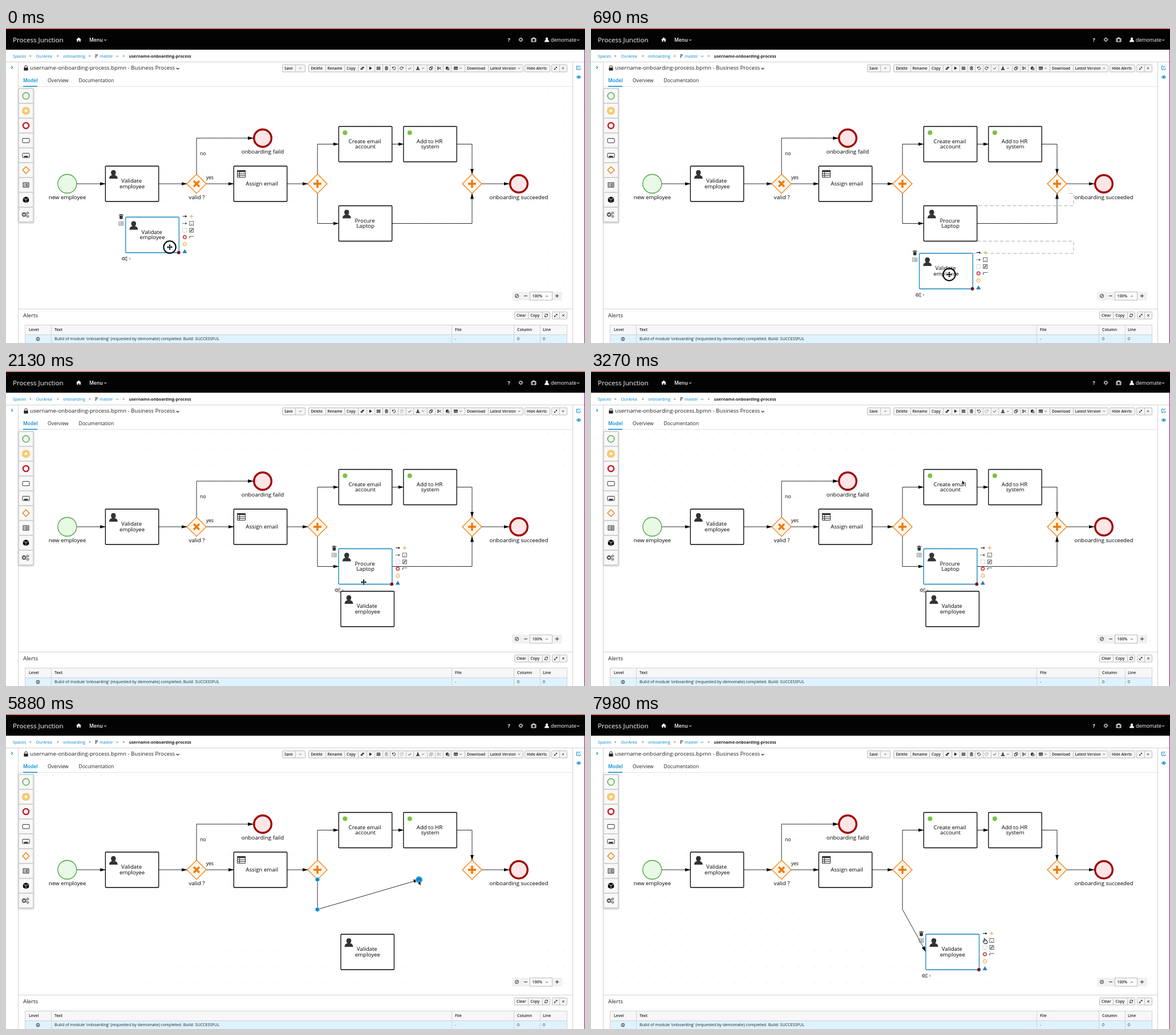
Animation, 1015 px wide and 552 px high, one loop 8 s. Source, as an HTML page:

```html
<!DOCTYPE html>
<html lang="en">
<head>
<meta charset="utf-8">
<title>Process editor</title>
<style>
html, body { margin: 0; width: 100%; height: 100%; overflow: hidden; background: #fff; }
svg { display: block; width: 1015px; height: 552px; font-family: "Open Sans", "Noto Sans", sans-serif; }
.i { fill: none; stroke: currentColor; stroke-width: 1; }
.f { fill: currentColor; stroke: none; }
.picked > rect { stroke: #2a8fc4; filter: drop-shadow(0 0 1px rgba(0, 136, 206, .45)); }
.joining > rect { stroke: #3f73c8; filter: drop-shadow(0 0 1.5px rgba(40, 100, 210, .6)); }
</style>
</head>
<body>
<svg id="stage" viewBox="0 0 1015 552" xmlns="http://www.w3.org/2000/svg"></svg>
<script>
const BLUE = '#0088ce', INK = '#222', ORANGE = '#ec7a08', LINE = '#d1d1d1';

// ---- drawing helpers
const text = (x, y, s, size, o = {}) =>
  `<text x="${x}" y="${y}" font-size="${size}" fill="${o.c || INK}" font-weight="${o.w || 400}" text-anchor="${o.a || 'start'}">${s}</text>`;
const mid = (x, y, s, size = 9.7, c = '#000') => text(x, y, s, size, { a: 'middle', c });
const rect = (x, y, w, h, fill, stroke = 'none', extra = '') =>
  `<rect x="${x}" y="${y}" width="${w}" height="${h}" fill="${fill}" stroke="${stroke}" ${extra}/>`;
const circle = (x, y, r, fill, stroke = 'none', sw = 1) =>
  `<circle cx="${x}" cy="${y}" r="${r}" fill="${fill}" stroke="${stroke}" stroke-width="${sw}"/>`;
const line = (d, c = LINE, w = 1, extra = '') =>
  `<path d="${d}" fill="none" stroke="${c}" stroke-width="${w}" ${extra}/>`;
const group = (id, body, extra = '') => `<g id="${id}" ${extra}>${body}</g>`;

const p = d => `<path class="i" d="${d}"/>`;
const s = d => `<path class="f" d="${d}"/>`;
const gear = '<circle class="i" r="2.2" stroke-width="1.7"/><circle class="i" r="3.4" stroke-width="1.3" stroke-dasharray="1.4 1.27"/>';
const icons = {
  caret: p('M-2 -1L0 1L2 -1'),
  up: p('M-2 1L0 -1L2 1'),
  right: p('M-1 -2L1 0L-1 2'),
  home: s('M0 -4L4.5 0H3.2V3.6H1V1H-1V3.6H-3.2V0H-4.5Z'),
  gear,
  gears: `<g transform="translate(-2 0) scale(.95)">${gear}</g><g transform="translate(3.5 -2.5) scale(.55)">${gear}</g><g transform="translate(3.5 2.7) scale(.55)">${gear}</g>`,
  bag: p('M-4 -2H4V3.5H-4ZM-1.5 -2V-3.5H1.5V-2M-2.3 -2V3.5M2.3 -2V3.5'),
  user: s('M0 -4A2.2 2.4 0 0 1 1.3 .3Q4 .8 4 4H-4Q-4 .8 -1.3 .3A2.2 2.4 0 0 1 0 -4Z'),
  lock: s('M-3.6 -.5H3.6V4.5H-3.6Z') + p('M-2.2 0V-2A2.2 2.2 0 0 1 2.2 -2V0'),
  branch: p('M-1.5 -3V3M1.7 -2.5V-1.2Q1.7 0 -1.5 1.5') + s('M-2.6 -3.8H-.4V-2H-2.6ZM-2.6 2H-.4V3.8H-2.6ZM.6 -3.6H2.8V-1.8H.6Z'),
  eraser: s('M-3.6 1L.2 -2.8H3.6L-.2 2.8H-3.6Z') + '<path d="M-2 .6H1.2" stroke="#fff" stroke-width=".8"/>',
  play: s('M-2.3 -3.2L3 0L-2.3 3.2Z'),
  grid: s('M-3.5 -3H3.5V3H-3.5Z') + '<path d="M-1.2 -3V3M1.2 -3V3M-3.5 -1H3.5M-3.5 1H3.5" stroke="#fff" stroke-width=".5"/>',
  trash: p('M-2.2 -1.6V3H2.2V-1.6M-3 -2H3M-1 -2V-3.2H1V-2M-.8 -.8V2M.8 -.8V2'),
  bin: s('M-3 -1.5H3L2.5 4.2H-2.5ZM-4 -3.5H-1.3V-4.4H1.3V-3.5H4V-2.3H-4Z'),
  undo: p('M-2.2 -1.3A2.8 2.8 0 1 1 -1.8 2') + s('M-3.4 -3.2V0H-.3Z'),
  redo: p('M2.2 -1.3A2.8 2.8 0 1 0 1.8 2') + s('M3.4 -3.2V0H.3Z'),
  check: '<path class="i" stroke-width="1.5" d="M-2.8 0L-.8 2L3 -2"/>',
  save: s('M-1 -3.2H1V-.6H2.8L0 2L-2.8 -.6H-1ZM-3.6 1.6H3.6V3.4H-3.6Z'),
  copy: p('M-3 -1.2H.8V3.2H-3ZM-.8 -1.2V-3H3V1.4H.8'),
  cut: p('M-1.6 -1.2L3.4 2.2M-1.6 1.2L3.4 -2.2') + '<circle class="i" cx="-2.5" cy="-1.8" r="1.1"/><circle class="i" cx="-2.5" cy="1.8" r="1.1"/>',
  paste: s('M-3.2 -2.6H-1.5V-3.4H.5V-2.6H1.8V-.8H-.6V2.4H-3.2Z') + p('M0 -.2H3V3.2H0Z'),
  form: p('M-3.3 -2.6H3.3V2.6H-3.3ZM-2 .2H2M-2 1.5H2') + s('M-3.3 -2.6H3.3V-1H-3.3Z'),
  expand: p('M-2 2L2 -2') + s('M0 -2.7H2.7V0ZM0 2.7H-2.7V0Z'),
  close: '<path class="i" stroke-width="1.5" d="M-1.8 -1.8L1.8 1.8M-1.8 1.8L1.8 -1.8"/>',
  refresh: p('M-2.5 -.6A2.6 2.6 0 0 1 2 -1.6M2.5 .6A2.6 2.6 0 0 1 -2 1.6') + s('M3 -3V-.5H.6ZM-3 3V.5H-.6Z'),
  edit: p('M2.6 .5V3.3H-3.6V-2.7H.6M-1.4 1L3.2 -3.6'),
  eye: p('M-4 0Q0 -4.6 4 0Q0 4.6 -4 0Z') + s('M0 -1.7A1.7 1.7 0 1 1 -.01 -1.7Z'),
  list: p('M-5 -4H5V4H-5Z') + p('M-3.5 -1.8H-2M-1 -1.8H3.6M-3.5 .1H-2M-1 .1H3.6M-3.5 2H-2M-1 2H3.6'),
  cube: s('M0 -5.5L5 -3.3L0 -1L-5 -3.3ZM-5.2 -2.4L-.4 -.2V5.4L-5.2 3ZM5.2 -2.4L.4 -.2V5.4L5.2 3Z'),
  person: s('M0 -8C5.5 -8 5 -1.2 2.3 .7Q7.3 1.8 7.5 7H-7.5Q-7.3 1.8 -2.3 .7C-5 -1.2 -5.5 -8 0 -8Z'),
  table: s('M-7.5 -6H7.5V-3H-7.5Z') + p('M-7 -5.8H7V6H-7ZM-7 0H7M-7 3H7M-3 -3V6'),
  arrow: '<path class="i" stroke-width="1.2" d="M-3.5 0H2"/>' + s('M1 -2L4 0L1 2Z'),
  dashArrow: '<path class="i" stroke-dasharray="1.4 .8" d="M-4 0H1.5"/>' + s('M1 -2L4 0L1 2Z'),
  plus: '<path class="i" stroke-width="1.8" d="M-3.2 0H3.2M0 -3.2V3.2"/>',
  minus: '<path class="i" stroke-width="1.6" d="M-2.8 0H2.8"/>',
  ban: '<circle class="i" r="3"/><path class="i" d="M-2 2L2 -2"/>',
};
const icon = (name, x, y, c = INK, k = 1, id = '') =>
  `<g ${id && `id="${id}"`} transform="translate(${x} ${y}) scale(${k})" color="${c}">${icons[name]}</g>`;

// ---- page around the canvas
function header() {
  const w = '#fff';
  return rect(0, 0, 1015, 38, '#030303') + rect(0, 0, 1015, 1, '#ddd') + rect(0, 1, 1015, 1, '#b30d14') +
    text(12, 25, 'Process Junction', 11.6, { c: w }) + icon('home', 127.5, 20.5, w) +
    text(146, 23.7, 'Menu', 8.5, { c: w, w: 600 }) + icon('caret', 174, 21, w) +
    text(879.5, 24, '?', 9, { c: w, w: 700 }) + icon('gear', 902.5, 20.5, w) + icon('bag', 925, 20.5, w) +
    icon('user', 948, 20.5, w) + text(955, 23.7, 'demomate', 8.8, { c: w }) + icon('caret', 1003, 21, w);
}
function crumbs() {
  const names = [[12, 'Spaces'], [52.5, 'OurArea'], [100, 'onboarding'], [164, 'master']];
  return names.map(([x, n]) => text(x, 51.8, n, 7.2, { c: BLUE })).join('') +
    [41, 89, 145, 204.5].map(x => text(x, 51.4, '»', 7, { c: '#444' })).join('') +
    icon('branch', 158.5, 49, INK, .75) + icon('caret', 195, 49.5, BLUE) +
    text(215.5, 51.8, 'username-onboarding-process', 7.2, { w: 700 });
}
function bar(x, y, w, seps) {
  return rect(x + .5, y + .5, w, 12.5, '#f5f5f5', '#bbb', 'rx="1"') +
    seps.map(v => line(`M${v + .5} ${y + .5}v12.5`, '#c4c4c4')).join('');
}
const label = (x, y, t) => text(x, y, t, 6.6, { w: 600 });
function toolbar() {
  const seps = [560, 593, 617, 632, 646, 660, 673, 687, 701, 714, 738, 752, 766, 780, 804, 845];
  const labels = [[488, 'Save'], [534.5, 'Delete'], [563.5, 'Rename'], [597, 'Copy'], [808, 'Download'], [848.5, 'Latest Version'], [913, 'Hide Alerts']];
  const set = [['eraser', 625], ['play', 639], ['grid', 653], ['trash', 667], ['undo', 680], ['redo', 693.5], ['check', 707.5],
    ['save', 722], ['copy', 745], ['cut', 759.5], ['paste', 774], ['form', 788.5], ['expand', 963.5], ['close', 976.5]];
  return bar(484, 64, 40, [507]) + bar(530, 64, 376, seps) + bar(909, 64, 44, []) + bar(956, 64, 27, [970]) +
    labels.map(([x, t]) => label(x, 72.8, t)).join('') +
    set.map(([n, x]) => icon(n, x, 70.5, INK, .9, 'tb-' + n)).join('') +
    [516, 731, 797, 899.5].map(x => icon('caret', x, 70.5, '#444', .9)).join('');
}
function frame() {
  return line('M0 59.5H1015M21.5 59.5V552M993.5 59.5V552') + line('M22 102.5H993', '#e4e4e4') +
    rect(1013.8, 2, 1.2, 550, '#a92a7c') +
    icon('right', 10.5, 69, BLUE, 1.2) + icon('edit', 1004, 69.5, BLUE) + icon('eye', 1004, 86, BLUE) +
    icon('lock', 35, 70) + text(42.3, 73.2, 'username-onboarding-process.bpmn - Business Process', 9.7) + icon('caret', 301, 71, INK, 1.2) +
    text(30, 94.8, 'Model', 8.5, { c: BLUE, w: 600 }) + text(73, 94.8, 'Overview', 8.5) + text(127.5, 94.8, 'Documentation', 8.5) +
    rect(30, 101.5, 25, 1.5, BLUE);
}
function alerts() {
  const head = [[40, 'Level'], [85, 'Text'], [787, 'File'], [896, 'Column'], [941, 'Line']];
  return rect(22, 492, 971, 60, '#fff') + line('M22 492.5H993') + text(30, 506.8, 'Alerts', 9.7) +
    bar(891, 497, 62, [915, 940]) + bar(957, 497, 26, [970]) +
    label(895, 506, 'Clear') + label(919.5, 506, 'Copy') + icon('refresh', 947, 503.7) +
    icon('expand', 963.7, 503.7) + icon('close', 977, 503.7) +
    rect(33.5, 520.5, 950, 17, '#f7f7f7', LINE) + rect(33.5, 537.5, 950, 20, '#def3ff', LINE) +
    line('M79.5 520V552M781.5 520V552M890.5 520V552M936.5 520V552') +
    head.map(([x, t]) => text(x, 530.6, t, 7, { w: 600 })).join('') +
    circle(56, 545, 2.9, 'none', INK, .9) + line('M56 543.2V547', INK, 1) +
    text(85, 547.3, "Build of module 'onboarding' (requested by demomate) completed. Build: SUCCESSFUL", 7.17) +
    text(787, 547.3, '-', 7) + text(896, 547.3, '0', 7) + text(941, 547.3, '0', 7);
}
function palette() {
  let out = rect(22, 106, 26, 234, '#fafafa', '#bbb', 'filter="url(#soft)"');
  for (let k = 0; k < 9; k++) out += rect(22.5, 106.5 + 26 * k, 25, 25, '#f8f8f8', LINE);
  return out + circle(35, 119, 5.8, '#eefbec', '#3f9c35', 1.3) +
    circle(35, 145, 6, '#fff7e8', '#f0a30a', 1.2) + circle(35, 145, 3.6, 'none', '#f0a30a', 1.2) +
    circle(35, 171, 5, '#fff', '#c4202c', 2.6) +
    rect(29, 193.5, 12, 7.5, '#fff', '#333', 'rx="1"') + rect(29, 219.5, 12, 7.5, '#fff', '#333', 'rx="1"') + rect(31.5, 224, 7, 2.6, '#333') +
    line('M35 243L41 249L35 255L29 249Z', ORANGE, 1.3) +
    icon('list', 35, 275) + icon('cube', 35, 301, '#000') + icon('gears', 34, 327, INK, 1.15);
}
function zoomBox() {
  return rect(887, 462, 88, 15.5, '#f1f1f1') + rect(918.5, 462.5, 39, 14.5, '#fafafa', '#bbb') +
    icon('ban', 895.5, 469.5) + icon('minus', 911, 469.5) + text(922.5, 472, '100%', 6.8, { w: 600 }) +
    icon('up', 948, 470, '#444', .9) + icon('plus', 966, 469.5);
}

// ---- diagram parts
const edge = (d, id = '') => `<path ${id && `id="${id}"`} d="${d}" fill="none" stroke="#222" stroke-width=".95" marker-end="url(#head)"/>`;
const box = (x, y) => rect(x, y, 93.4, 62, '#fff', '#000', 'stroke-width="1.3" rx="1"');
const lines = (x, y, a, b) => mid(x - .6, y, a) + mid(x + .4, y + 9.2, b);
const task = (a, b) => box(0, 0) + icon('person', 14, 15, '#333') + lines(46.4, 29.3, a, b);
const at = (x, y, body) => `<g transform="translate(${x} ${y})">${body}</g>`;
const service = (x, a, b) => box(x, 172.5) + circle(x + 11, 183.5, 4, '#7cc142') + lines(x + 46.3, 201.7, a, b);
const gateway = (x, turn) => line(`M${x} 256l17 17l-17 17l-17 -17Z`, ORANGE, 1.2, 'style="fill:#fef5ea"') +
  line('M-7 0H7M0 -7V7', ORANGE, 3.4, `transform="translate(${x} 273) rotate(${turn})"`);
const end = (x, y) => circle(x, y, 15.3, '#ffe6e6', '#a30000', 3.4);

function dots() {
  let out = '';
  for (let x = 54.5; x < 990; x += 28) for (let y = 108; y < 490; y += 28) out += `M${x} ${y}h1`;
  return line(out, '#c8c8c8', 1);
}
const routes = ['M124 273H174', 'M268 273H317', 'M334 256V193H433.5', 'M351 273H399', 'M493 273H529',
  'M546 256V203.5H583', 'M677 203.5H697', 'M790 203.5H817V256', 'M834 273H882'];

function diagram() {
  return routes.map(d => edge(d)).join('') + edge('M677 342.5H817V290', 'outEdge') + edge('', 'freeEdge') +
    circle(107.3, 273, 16.5, '#e8fae6', '#4aa341', 1.3) + end(450, 193) + end(899, 273) +
    gateway(334, 45) + gateway(546, 0) + gateway(817, 0) +
    at(174.3, 242, task('Validate', 'employee')) +
    box(399.3, 242) + icon('table', 412.5, 255.5, '#333') + mid(448.5, 276, 'Assign email') +
    service(583.3, 'Create email', 'account') + service(696.8, 'Add to HR', 'system') +
    mid(107.5, 300, 'new employee') + mid(334.5, 300, 'valid ?') + mid(450, 219.6, 'onboarding faild') +
    mid(899, 300, 'onboarding succeeded') + mid(345.3, 222.8, 'no', 8.6) + mid(357.3, 265, 'yes', 8.6) +
    group('laptop', task('Procure', 'Laptop'), 'transform="translate(583.3 311.5)"') +
    group('guide', line('M838 290H846V311.5H677M677 373.5H846V395H669', '#aaa', 1, 'stroke-dasharray="6 4"')) +
    group('worker', task('Validate', 'employee'));
}
function toolbox() {
  const grey = '#444';
  return icon('bin', -8, -1, '#333') + icon('list', -8, 11, '#777', .8) +
    icon('arrow', 103.5, -1.5, '#111') + icon('plus', 115.5, -1.5, '#f09a2a') +
    icon('dashArrow', 103.5, 11, grey) + rect(112, 7.5, 7, 7, '#fff', grey, 'stroke-width=".8"') + line('M114.5 12.5h2', grey) +
    rect(100, 19.5, 7, 7, 'none', '#aaa', 'stroke-width=".8" stroke-dasharray="1.5 1"') +
    rect(112, 19.5, 7, 7, '#eee', grey, 'stroke-width=".8"') + line('M113.5 25L117.5 21', grey, 1.4) +
    circle(103.5, 35, 2.7, '#fff', '#c9303c', 1.5) + line('M112 37V33.5H120', grey, 1.1, 'stroke-dasharray="3 .6"') +
    circle(103.5, 47.3, 3.2, '#fffaf0', '#f0a030', 1) + circle(103.5, 47.3, .7, '#f0a030') +
    `<path d="M103.5 56L107.5 63H99.5Z" fill="#2b7cb3"/>` + circle(93, 62, 2.9, '#7d1420') +
    icon('gears', -2, 72.7, INK, .9) + icon('right', 7, 72.7, INK, .8);
}
const knob = (x, y) => circle(x, y, 3.7, BLUE, '#a9d6ef', 1.2);
const magnets = [[46.5, 0], [93.4, 31], [46.5, 62], [0, 31], [46.5, 31]].map(([x, y]) => circle(x, y, 4, '#1b8fd0')).join('');
const cursors =
  group('curMove', '<path d="M0 -4V4M-4 0H4" stroke="#fff" stroke-width="3.4"/><path d="M-3.5 0H3.5M0 -3.5V3.5" stroke="#000" stroke-width="1.4"/><path d="M0 -5L1.9 -2.8H-1.9ZM0 5L1.9 2.8H-1.9ZM-5 0L-2.8 -1.9V1.9ZM5 0L2.8 -1.9V1.9Z"/>') +
  group('curArrow', '<path d="M0 0V8L1.9 6.3L3.2 9L4.6 8.3L3.3 5.7H5.7Z" fill="#000" stroke="#fff" stroke-width=".7"/>') +
  group('curHand', '<path d="M-2 -4.5Q-1 -5.2 -.4 -4L.4 -1.4L3 -.6Q4 -.2 3.8 1.2L3 4.5H-1.2L-3.8 1.2Q-3.6 0 -2.2 .6L-1.4 1Z" fill="#fff" stroke="#000" stroke-width="1"/>');

const stage = document.getElementById('stage');
stage.innerHTML = `<defs>
  <marker id="head" markerUnits="userSpaceOnUse" markerWidth="10" markerHeight="8" refX="9.5" refY="4" orient="auto"><path d="M0 1L10 4L0 7Z"/></marker>
  <filter id="soft" x="-20%" y="-5%" width="140%" height="110%"><feDropShadow dx="0" dy="1" stdDeviation="1.6" flood-opacity=".3"/></filter>
  </defs>` + rect(0, 0, 1015, 552, '#fff') + dots() + diagram() + palette() + group('zoom', zoomBox()) +
  frame() + header() + crumbs() + toolbar() + alerts() +
  group('tools', toolbox()) + group('magnets', magnets) +
  group('knobs', knob(546, 290) + knob(546, 342.5)) +
  '<circle id="grip" r="5.8" stroke-width="1.4"/>' +
  '<circle id="ring" fill="#fff" fill-opacity=".25" stroke="#000" stroke-width="2"/>' + group('cursor', cursors);

// ---- motion
const $ = id => document.getElementById(id);
const LOOP = 8000, DROP = 840, PICK = 1950, ERASE = 4230, LINK = 5460, GRAB = 5910, JOIN = 6720, SELECT = 7360;
const LAPTOP = [583.3, 311.5];

// each key: time, x, y
const workerKeys = [[30, 209.8, 331.5], [690, 575.7, 395], [810, 587, 386]];
const pointerKeys = [[30, 287, 384], [690, 628, 432], [810, 640, 424], [1110, 640, 424], [1260, 642, 418],
  [1440, 642, 418], [1770, 627, 370], [2370, 627, 370], [3960, 666, 72], [4530, 666, 72], [5670, 723, 292],
  [5910, 723, 292], [6510, 600, 427], [6960, 600, 427], [7290, 632, 420], [7440, 632, 420], [7960, 691, 398]];
const presses = [[-200, DROP], [1890, 2010], [4140, 4260], [GRAB, JOIN], [7290, 7390]];

const ease = u => u * u * (3 - 2 * u);
function along(keys, t) {
  const n = keys.findIndex(k => k[0] > t);
  if (n === 0) return keys[0].slice(1);
  if (n < 0) return keys[keys.length - 1].slice(1);
  const a = keys[n - 1], b = keys[n], u = ease((t - a[0]) / (b[0] - a[0]));
  return [a[1] + (b[1] - a[1]) * u, a[2] + (b[2] - a[2]) * u];
}
const show = (id, on) => $(id).style.display = on ? '' : 'none';
const mark = (id, name, on) => $(id).classList.toggle(name, on);
const place = (id, [x, y]) => $(id).setAttribute('transform', `translate(${x.toFixed(2)} ${y.toFixed(2)})`);
const inside = ([x, y], [l, t]) => x > l && x < l + 94 && y > t && y < t + 62;
const within = (t, a, b) => t >= a && t < b;

function drawRing(t, [x, y]) {
  const press = presses.find(([a, b]) => within(t, a, b + 120));
  show('ring', press);
  if (!press) return;
  const grow = Math.max(0, (t - press[1]) / 120), enter = Math.min(1, (t - press[0]) / 60);
  const ring = $('ring');
  ring.setAttribute('r', 10.7 + 8 * grow + 5 * (1 - enter));
  ring.setAttribute('opacity', enter * (1 - grow));
  ring.setAttribute('cx', x);
  ring.setAttribute('cy', y);
}

function draw(t) {
  const worker = along(workerKeys, t), pointer = along(pointerKeys, t);
  const erased = t >= ERASE, linking = within(t, GRAB, JOIN);

  place('worker', worker);
  show('guide', within(t, 600, 730));
  show('laptop', !erased);
  show('outEdge', !erased);

  let tip = [724, 290.5];
  if (linking) tip = [pointer[0] + 1.5, pointer[1] - 2];
  if (t >= JOIN) tip = [587, 416.7];
  $('freeEdge').setAttribute('d', erased ? `M546 290V342.5L${tip}` : 'M546 290V342.5H583');

  const linked = within(t, LINK, SELECT), onWorker = linking && inside(pointer, worker);
  show('knobs', linked);
  show('grip', linked);
  const grip = $('grip');
  grip.setAttribute('cx', tip[0]);
  grip.setAttribute('cy', tip[1]);
  grip.setAttribute('fill', onWorker ? '#fff' : BLUE);
  grip.setAttribute('stroke', onWorker ? BLUE : '#8cc8ea');
  show('magnets', onWorker);
  place('magnets', worker);
  mark('worker', 'joining', onWorker);

  const laptopPicked = within(t, PICK, ERASE), workerPicked = t < PICK || t >= SELECT;
  mark('laptop', 'picked', laptopPicked);
  mark('worker', 'picked', workerPicked);
  show('tools', laptopPicked || workerPicked);
  place('tools', laptopPicked ? LAPTOP : worker);
  show('zoom', pointer[1] > 102);

  const idle = within(t, ERASE, SELECT);
  for (const n of ['trash', 'copy', 'cut']) $('tb-' + n).style.opacity = idle ? .4 : 1;
  $('tb-redo').style.opacity = t >= DROP ? .4 : 1;

  const hand = t > SELECT && pointer[0] > 683;
  const move = !linked && (t < DROP || inside(pointer, worker) || !erased && inside(pointer, LAPTOP));
  show('curHand', hand);
  show('curMove', move && !hand);
  show('curArrow', !move && !hand);
  place('cursor', pointer);
  drawRing(t, pointer);
}

const start = performance.now();
function tick() {
  draw((performance.now() - start) % LOOP);
  requestAnimationFrame(tick);
}
tick();
</script>
</body>
</html>
```
